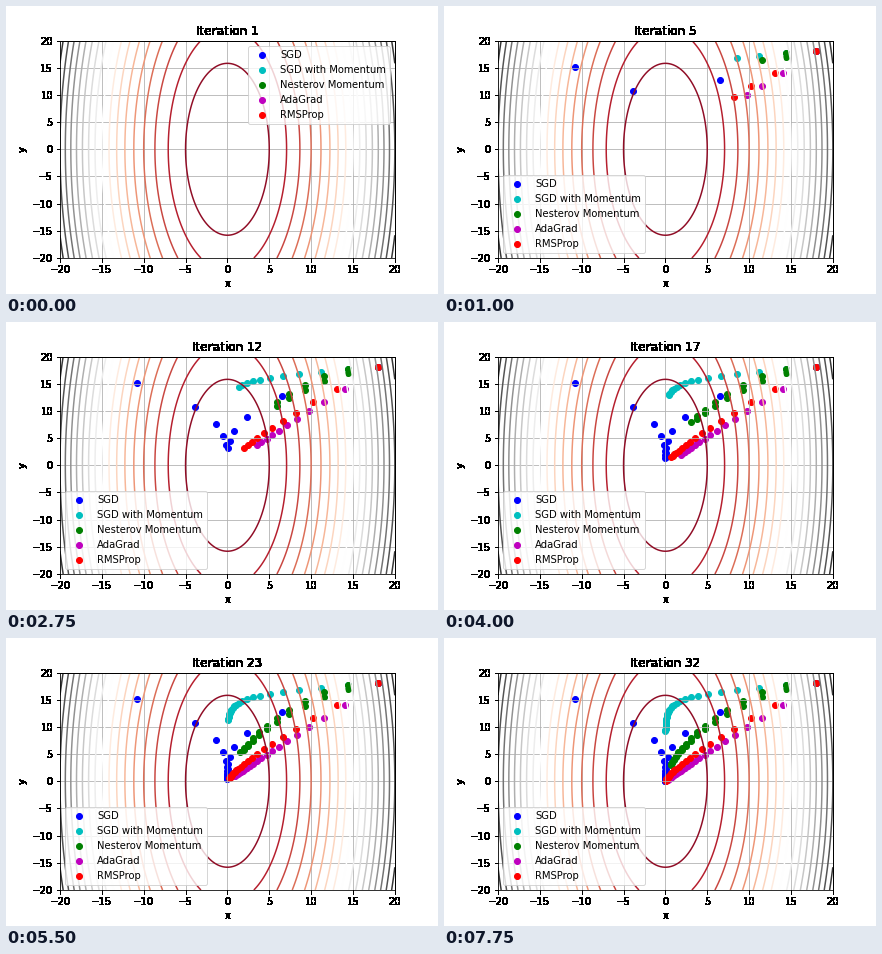
These frames come from a looping animation (432x288 px, 8 s). A matplotlib script:

```python
import numpy as np
import matplotlib.pyplot as plt
from matplotlib.animation import FuncAnimation

FRAMES = 32
START = np.array([18.0, 18.0])
CURVATURE = np.array([2.0, 0.2])   # f(x, y) = x^2 + y^2 / 10
EPS = 0.1


def grad(p):
    return CURVATURE * p


def sgd(lr=0.8):
    def step(p):
        return lr * grad(p)
    return step


def momentum(lr=0.1, beta=0.1):
    v = np.zeros(2)

    def step(p):
        nonlocal v
        v = beta * v + lr * grad(p)
        return v
    return step


def nesterov(lr=0.1, beta=0.8):
    v, last = np.zeros(2), grad(START)

    def step(p):
        nonlocal v, last
        g = grad(p)
        v = beta * v + lr * g + beta * (g - last)
        last = g
        return v
    return step


def adagrad(lr=4.0):
    total = np.zeros(2)

    def step(p):
        nonlocal total
        g = grad(p)
        total = total + g ** 2
        return lr * g / (np.sqrt(total) + EPS)
    return step


def rmsprop(lr=0.5, rho=0.99):
    mean = np.zeros(2)

    def step(p):
        nonlocal mean
        g = grad(p)
        mean = rho * mean + (1 - rho) * g ** 2
        return lr * g / (np.sqrt(mean) + EPS)
    return step


def descend(step):
    path = [START]
    while len(path) < FRAMES:
        path.append(path[-1] - step(path[-1]))
    return np.array(path)


def solid(image, dpi):
    """Turn every touched pixel fully black, giving hard-edged text."""
    out = np.zeros_like(image)
    out[..., 3] = image[..., 3] > 0
    return out, 0, 0


fig = plt.figure(figsize=(6, 4), dpi=72, facecolor="white")
fig.subplots_adjust(left=0.125, right=0.9, bottom=0.125, top=0.88)
ax = fig.add_subplot()

side = np.linspace(-20, 20, 200)
X, Y = np.meshgrid(side, side)
ax.contour(X, Y, X ** 2 + Y ** 2 / 10, levels=np.arange(0, 451, 25), cmap="RdGy")

methods = [
    ("SGD", "b", sgd()),
    ("SGD with Momentum", "c", momentum()),
    ("Nesterov Momentum", "g", nesterov()),
    ("AdaGrad", "m", adagrad()),
    ("RMSProp", "r", rmsprop()),
]
paths = [descend(step) for _, _, step in methods]
dots = [ax.scatter([], [], color=color, label=name) for name, color, _ in methods]

ax.set(xlim=(-20, 20), ylim=(-20, 20), xlabel="x", ylabel="y",
       xticks=range(-20, 21, 5), yticks=range(-20, 21, 5))
ax.grid(True)
legend = ax.legend(loc="upper right")

hard = [ax.title, ax.xaxis.label, ax.yaxis.label, ax.spines["top"], ax.spines["right"]]
for axis in (ax.xaxis, ax.yaxis):
    for tick in axis.get_major_ticks():
        hard += [tick.label1, tick.tick1line]
for artist in hard:
    artist.set_agg_filter(solid)


def update(i):
    for dot, path in zip(dots, paths):
        dot.set_offsets(path[:i])
    ax.set_title(f"Iteration {i + 1}")
    # The legend moves to the first corner that is free of points.
    legend.set_loc(("upper right", "upper left", "lower left")[min(i, 2)])
    return dots


anim = FuncAnimation(fig, update, frames=FRAMES, interval=250, repeat=True,
                     repeat_delay=0, blit=False)
plt.show()
```
